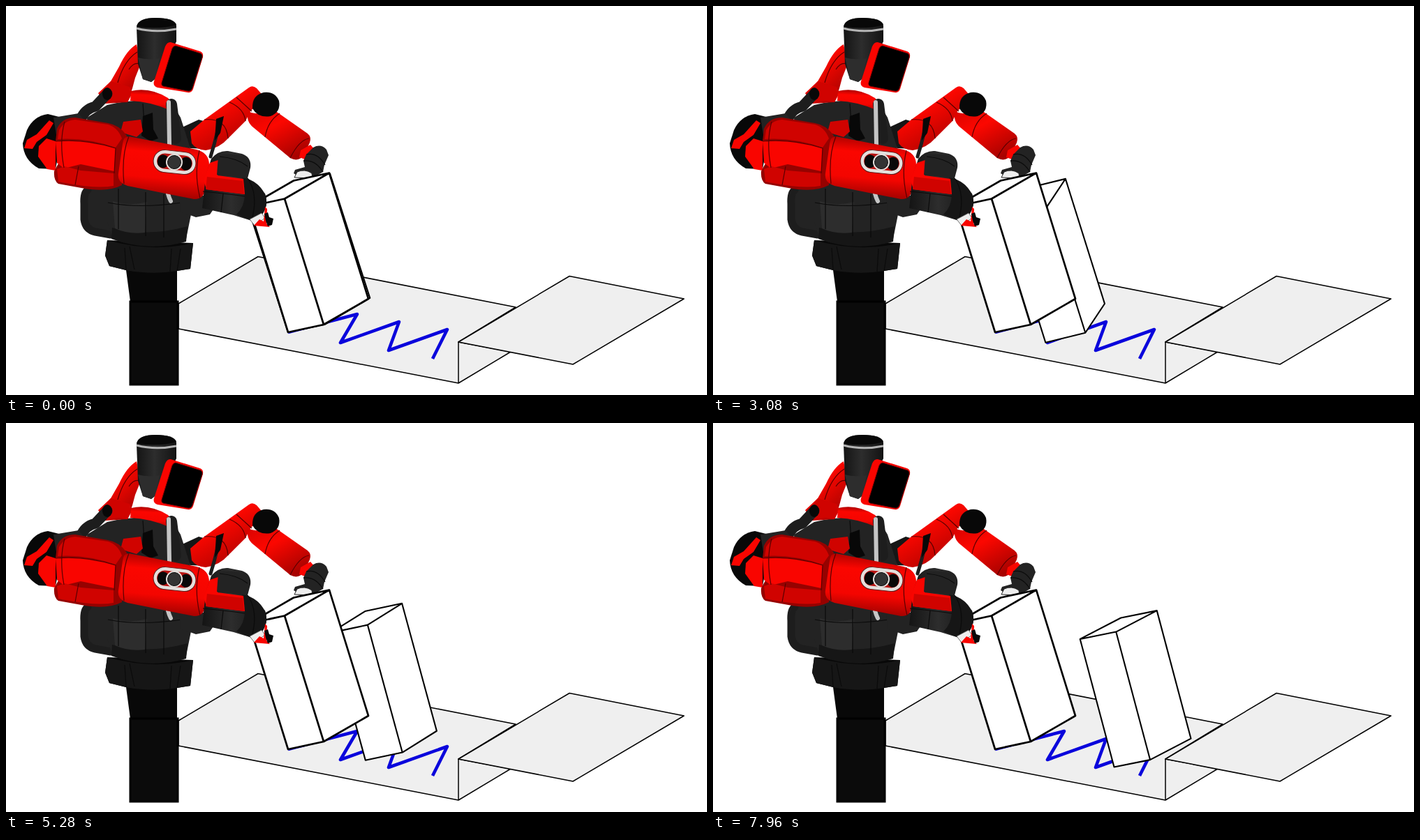
An HTML page that plays this animation: 1004x558 px, repeating every 8 s.

```html
<!DOCTYPE html>
<html lang="en">
<head>
<meta charset="utf-8">
<title>Walking a box</title>
<style>
html, body { margin: 0; width: 100%; height: 100%; overflow: hidden; background: #fff; }
svg { display: block; width: 100vw; height: 100vh; }
.floor { fill: #efefef; stroke: #000; stroke-width: 1.5; stroke-linejoin: round; }
.edge { fill: none; }
.trail { fill: none; stroke: #0a05dc; stroke-width: 4.6; stroke-linejoin: round; }
.box { fill: #fff; stroke: #000; stroke-width: 2.1; stroke-linejoin: round; }
.held { stroke-width: 2.7; }
.red { fill: #f90500; }
.mid { fill: #d00300; }
.deep { fill: #960200; }
.dark { fill: #232323; }
.dim { fill: #161616; }
.black { fill: #080808; }
.soft { fill: #2d2d2d; }
.seam { fill: none; stroke: #0b0b0b; stroke-width: 1.2; }
.cut { fill: none; stroke: #5a0000; stroke-width: 1.2; }
.tube { fill: none; stroke: #1d1d1d; stroke-linecap: round; stroke-linejoin: round; }
.rail { fill: none; stroke-linecap: round; }
</style>
</head>
<body>
<svg viewBox="0 0 1004 558" preserveAspectRatio="none">
  <defs>
    <linearGradient id="arm" x1="0" y1="0" x2="-.12" y2="1">
      <stop offset="0" stop-color="#b80200"/><stop offset=".2" stop-color="#fb0600"/>
      <stop offset=".6" stop-color="#f40500"/><stop offset="1" stop-color="#850100"/>
    </linearGradient>
    <linearGradient id="limb" x1="0" y1="0" x2=".7" y2="1">
      <stop offset="0" stop-color="#d80300"/><stop offset=".4" stop-color="#fc0700"/>
      <stop offset="1" stop-color="#a60200"/>
    </linearGradient>
    <linearGradient id="shell">
      <stop offset="0" stop-color="#141414"/><stop offset=".45" stop-color="#2d2d2d"/>
      <stop offset="1" stop-color="#131313"/>
    </linearGradient>
  </defs>

  <!-- ground and platform -->
  <path class="floor" d="M247 427L361 359.500L730 432L648 482L723 496L648 541L247 463Z"/>
  <path class="floor" d="M648 482L807 387.500L971 420L812 514Z"/>
  <path class="floor edge" d="M648 482V541"/>
  <path class="trail" d="M404 468L503 442L479 483L563 453L548 494L632 464L611 506"/>
  <path id="mover" class="box"/>

  <!-- far arm -->
  <path class="dim" d="M248 176L276 163L300 170L290 205L264 204Z"/>
  <path fill="url(#limb)" d="M264 180L284 163L348 117Q353 113 359 118L370 131L350 151L343 165L318 190Q306 204 286 207Q272 206 266 197Z"/>
  <path class="cut" d="M284 163Q316 160 318 190M320 138Q341 147 343 165M330 131L352 151"/>
  <path fill="url(#limb)" d="M347 151Q360 158 385 150L432 183Q438 188 435 196L426 215Q418 224 407 218L354 174Q343 165 347 151Z"/>
  <path class="cut" d="M434 190Q420 192 407 218M392 154Q375 165 371 188"/>
  <path class="red" d="M422 207L436 199L443 207L431 221L420 217Z"/>
  <path class="black" d="M353 147Q352 128 369 124Q385 122 391 136Q394 152 379 158Q361 161 353 147Z"/>
  <path class="dark" d="M430 213L440 203Q451 197 459 206L462 214L456 228L454 238L440 246L420 245L412 240L414 235L428 231L426 222Z"/>
  <path class="seam" d="M430 213Q446 209 457 228M426 222Q443 220 454 238"/>
  <path fill="#eee" stroke="#222" d="M413 246L417 238Q428 233 438 240L439 247Z"/>

  <!-- box held by the arms -->
  <path id="still" class="box held"/>

  <!-- stand and torso -->
  <path class="black" d="M145 336L142 358L148 373L172 379L178 424H245V380L264 377L268 340Z"/>
  <path class="dim" d="M145 336L142 358L148 373L172 379Q210 386 245 380L264 377L268 340Q210 354 145 336Z"/>
  <path class="seam" d="M172 379L170 347M245 380L250 348M177 345L184 378M237 348L235 381"/>
  <path fill="#0b0b0b" stroke="#000" stroke-width="3" d="M178 424H246V543H178Z"/>
  <path class="dark" d="M114 262L150 258V330L126 324L112 306Z"/>
  <path class="tube" stroke-width="11" d="M117 264Q111 268 112 284V306Q114 321 128 324L150 328"/>
  <path class="dark" d="M116 160L145 142Q192 130 238 140L250 160L264 204L266 294L258 334Q205 348 152 332L145 310V262L121 252Z"/>
  <path class="dim" d="M152 318Q205 332 260 316L258 338Q204 354 151 334Z"/>
  <path class="soft" d="M153 280Q178 288 202 281L199 325Q176 328 156 319Z"/>
  <path class="seam" d="M146 282Q190 291 252 282M200 267V330M161 262V320M226 270V332M196 140L199 182"/>
  <path class="black" d="M196 158L210 153L211 177L218 190L207 194L194 186Z"/>

  <!-- neck, collar and head -->
  <path fill="url(#limb)" d="M187 55Q173 63 162 87L150 108L132 125L142 140L174 138L181 118L185 103L193 83Z"/>
  <path class="mid" d="M150 108L177 116L181 125L174 138L161 136L145 138L138 124Z"/>
  <path class="cut" d="M188 66Q169 78 160 110M192 83Q183 80 176 91"/>
  <path fill="url(#arm)" d="M179 122Q206 116 232 132L241 142L236 150Q207 137 178 136Z"/>
  <path class="tube" stroke-width="15" d="M107 163Q112 148 128 144L145 126"/>
  <ellipse class="black" cx="145" cy="126" rx="7" ry="9"/>
  <path fill="url(#shell)" d="M187 30Q190 17 214 17Q241 17 244 28V51L230 78L216 103L208 109L196 105L189 83Z"/>
  <path class="soft" d="M189 74Q203 78 220 75L213 105L208 109L196 105Z"/>
  <path class="black" d="M187 29Q190 17 214 17Q241 17 244 27Q217 35 187 29Z"/>
  <path fill="none" stroke="#b5b5b5" stroke-width="3.2" d="M187 32Q214 39 244 33"/>
  <path class="red" d="M236 52L278 65Q283 67 282 73L268 119Q266 125 260 124L217 117Q210 115 212 108L228 58Q231 51 236 52Z"/>
  <path fill="#000" stroke="#700000" d="M243 57L279 68Q282 70 281 74L267 118Q265 123 260 122L225 115Q222 114 223 110L238 61Q240 57 243 57Z"/>

  <!-- rails -->
  <path class="rail" stroke="#1d1d1d" stroke-width="16" d="M237 141L243 190"/>
  <path class="rail" stroke="#c5c5c5" stroke-width="6" d="M233 138L234 200M230 257Q231 270 236 280"/>
  <path class="mid" d="M168 166L193 163L196 180L187 188L164 181Z"/>

  <!-- near arm -->
  <path class="black" d="M60 155Q39 158 30 178L24 197Q25 221 47 233L71 234L84 161Z"/>
  <path class="red" d="M30 192L44 184L62 164L68 168L58 185L44 195L38 205L26 204Z"/>
  <path class="red" d="M47 201L58 190L71 194V236L59 234L46 216Z"/>
  <path class="dark" d="M68 160L104 154L112 164L84 166L72 185Z"/>
  <path class="deep" d="M73 176Q80 160 99 160L146 168Q163 171 173 186L166 257Q145 268 108 261L75 255Q68 250 69 237L75 226L71 194Z"/>
  <path class="mid" d="M76 178Q84 164 99 163L146 170Q160 174 166 190L157 203Q113 188 74 191Z"/>
  <path class="red" d="M71 194Q113 190 157 204L155 237L107 227L83 233L73 225Z"/>
  <path class="mid" d="M73 234L84 230L107 236L154 240V258Q128 263 75 252Z"/>
  <path class="cut" d="M84 166Q76 194 83 232M71 194Q113 190 157 204L155 240M104 230L99 257"/>

  <path class="dark" d="M248 270L286 272L305 280L292 299L272 303L250 295Z"/>
  <path class="tube" stroke-width="5" d="M307 163L298 199L293 216"/>
  <path class="black" d="M301 162L312 158L307 182L299 193Z"/>
  <path fill="url(#arm)" d="M176 187L273 206Q292 211 291 230L286 262Q283 278 269 277L174 258Q159 253 161 240L167 198Q168 187 176 187Z"/>
  <path class="cut" d="M176 187Q165 214 169 255M277 207Q269 240 278 276"/>
  <g transform="rotate(6 241 224)">
    <rect x="211" y="208" width="61" height="32" rx="16" fill="#e4e0dd" stroke="#5f1a18"/>
    <rect x="216" y="213" width="51" height="22" rx="11" fill="#b71412"/>
    <rect x="217" y="215" width="16" height="19" rx="8" class="black"/>
    <rect x="250" y="215" width="16" height="19" rx="8" class="black"/>
    <circle cx="241" cy="224" r="12" fill="#e4e0dd"/>
    <circle cx="241" cy="224" r="9.500" fill="#333" stroke="#111"/>
  </g>

  <path fill="url(#shell)" d="M294 219Q304 207 318 208L338 212Q352 217 350 232L346 247L371 269Q377 286 366 300L352 308L326 300L281 290L286 244Z"/>
  <path class="dim" d="M338 246Q360 249 371 270Q377 288 365 301L352 308L330 299Q349 281 338 246Z"/>
  <path class="red" d="M292 225L307 220L303 243L340 248L342 270L287 263L283 250Z"/>
  <path class="dark" d="M304 215Q323 209 346 218Q352 227 344 247L302 242Z"/>
  <path class="mid" d="M288 245L339 251L341 270L286 263Z"/>
  <path class="seam" d="M306 216Q331 218 346 230M282 266Q314 269 342 273M311 269L308 296M346 247Q362 270 352 307"/>

  <!-- gripper -->
  <path fill="#eee" stroke="#555" stroke-width=".8" d="M349 306L366 297L371 304L356 315Z"/>
  <path class="red" d="M355 315L363 306L369 309L371 288L374 291L373 312L378 317Z"/>
  <path class="black" d="M370 298L375 296L377 303L383 305L381 314L375 316L372 308Z"/>
</svg>

<script>
const LOOP = 8000;
const START = 160;

// footholds of the two floor corners
const left = [[404, 468], [479, 484], [547, 495], [611, 505]];
const back = [[424, 442], [504, 441], [564, 453], [633, 463]];

const byId = id => document.getElementById(id);
const wave = x => Math.sin(Math.PI * x);

// a slow first stride, then a steady walk
const stridesAt = t =>
  Math.max(0.43 + (Math.max(t, START) - START) / 2300, 1.31 + (t - 2160) / 1408);

function swing([x0, y0], [x1, y1], u, lift) {
  return [x0 + (x1 - x0) * u, y0 + (y1 - y0) * u - lift * wave(u)];
}

// even strides swing the back corner round the left one, odd strides the reverse
function boxAt(time) {
  const n = stridesAt(time), stride = Math.floor(n), u = n - stride;
  const k = stride >> 1, onLeft = stride % 2 === 0;
  const l = onLeft ? left[k] : swing(left[k], left[k + 1], u, 6);
  const b = onLeft ? swing(back[k], back[k + 1], u + 0.12 * wave(u), 11) : back[k + 1];
  const tilt = wave(n + 0.5), lean = wave(n + 0.25);
  return {
    left: l,
    deep: [b[0] - l[0], b[1] - l[1]],
    wide: [52.5 + 4.5 * tilt, -11 - 3 * tilt],
    up: [-53 - 5 * lean, -181 + 3 * lean]
  };
}

function boxPath({ left, wide, deep, up }) {
  const at = (w, d, u) =>
    [0, 1].map(i => (left[i] + w * wide[i] + d * deep[i] + u * up[i]).toFixed(2)).join(' ');
  const front = at(1, 0, 1), foot = at(1, 0, 0);
  const rim = [at(0, 0, 1), at(0, 1, 1), at(1, 1, 1)];
  return `M${[at(0, 0, 0), ...rim, at(1, 1, 0), foot].join('L')}Z`
    + `M${rim[0]}L${front}L${rim[2]}M${front}L${foot}`;
}

byId('still').setAttribute('d', boxPath({
  left: left[0], wide: [51, -11], deep: [64, -37], up: [-56, -180.5]
}));

const begin = performance.now();
function draw(now) {
  const time = Math.max(now - begin, 0) % LOOP;
  byId('mover').setAttribute('d', boxPath(boxAt(time)));
  requestAnimationFrame(draw);
}
draw(begin);
</script>
</body>
</html>
```
